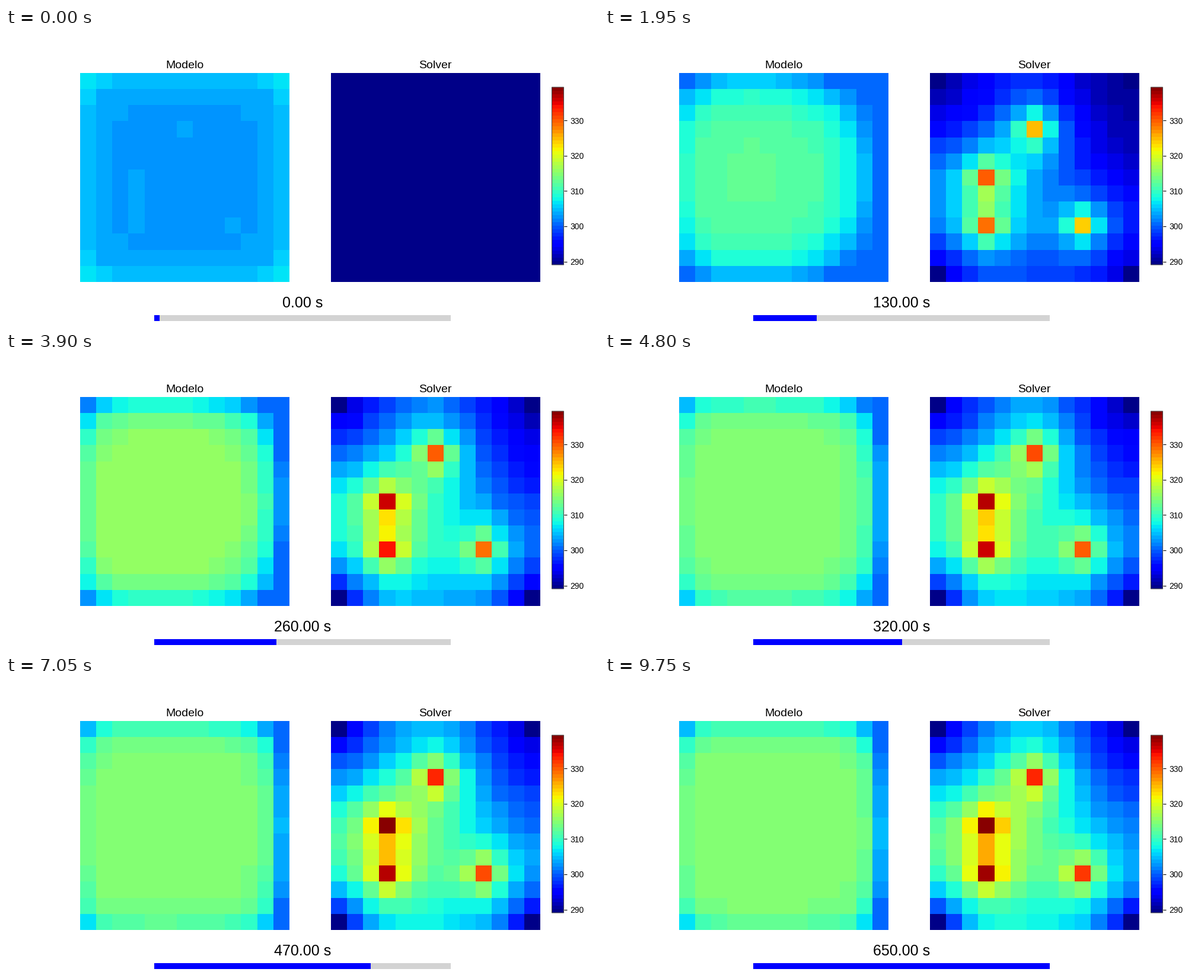
Animation of 1000 by 500 pixels, one loop 9.9 s. Source, as a matplotlib script:

```python
import numpy as np
import matplotlib.pyplot as plt
from matplotlib.animation import FuncAnimation
from matplotlib.colors import ListedColormap
from matplotlib.patches import Rectangle

plt.rcParams["font.family"] = "Liberation Sans"

N = 13
FRAMES = 66
STEP = 10            # simulated seconds per frame
T_MIN, T_MAX = 289.1, 339.4
HEATERS = ([3, 6, 9, 9], [6, 3, 3, 9])
CORNERS = ([0, 0, -1, -1], [0, -1, 0, -1])
NEAR = np.arange(N)  # cell distance from the top or left side
FAR = NEAR[::-1]     # cell distance from the bottom or right side


def solve_board():
    """Conduction with four heaters, radiating faces and cold corners."""
    rate, heat, emission, t_env, t_cold = 0.096, 66.7, 4.18e-10, 279.0, 290.0
    temp = np.full((N, N), t_cold)
    source = np.zeros((N, N))
    source[HEATERS] = heat
    history = [temp.copy()]
    for _ in range(FRAMES - 1):
        for _ in range(STEP):
            p = np.pad(temp, 1, mode="edge")
            lap = p[:-2, 1:-1] + p[2:, 1:-1] + p[1:-1, :-2] + p[1:-1, 2:] - 4 * temp
            temp = temp + rate * (lap + source - emission * (temp**4 - t_env**4))
            temp[CORNERS] = t_cold
        history.append(temp.copy())
    return history


def smoothstep(x):
    x = np.clip(x, 0, 1)
    return x * x * (3 - 2 * x)


def first_guess():
    """Nearly flat board with warm borders and faint heater traces."""
    rim = np.exp(-NEAR / 0.8) + np.exp(-FAR / 0.8)
    board = 302.9 + 1.9 * (rim[:, None] + rim)
    board[HEATERS] += 0.5
    board[7:9, 3] += 0.5
    return board


def warm_board(t):
    """Plateau that overshoots, then settles, with cooling from each side."""
    overshoot = np.exp(-((t - 210) / 50) ** 2 / 2)
    spread = np.exp(-max(0, t - 130) / 150)
    plateau = 303 + 11.7 * smoothstep(t / 190) + 2.5 * overshoot

    top = (9.9 + 5 * overshoot) * np.exp(-NEAR / (1.6 + 0.7 * spread))
    bottom = (7.8 + 2.5 * spread + 5 * overshoot) * np.exp(-FAR / (1.6 + 0.7 * spread))
    left = (5.7 + 3.5 * overshoot) * np.exp(-NEAR / (0.7 + spread))
    right = (16 + 4.5 * overshoot) * np.exp(-FAR / (1 + 2 * spread))

    cooling = (top + bottom)[:, None] + left + right - 6
    drop = 1.5 * np.logaddexp(0, cooling / 1.5)
    return np.maximum(plateau - drop, 301)


def model_board(t):
    mix = min(1, t / 130)
    return (1 - mix) * first_guess() + mix * warm_board(t)


solver_boards = solve_board()
bands = ListedColormap(plt.get_cmap("jet")((np.arange(50) + 0.5) / 50))

fig, axes = plt.subplots(1, 2, figsize=(10, 5), dpi=100)
images = []
for ax, title in zip(axes, ("Modelo", "Solver")):
    images.append(ax.imshow(np.full((N, N), 290.0), cmap=bands, vmin=T_MIN, vmax=T_MAX,
                            interpolation="nearest"))
    ax.set_title(title, fontsize=14)
    ax.axis("off")

bar = fig.colorbar(images[1], cax=fig.add_axes([0.9205, 0.2, 0.02, 0.6]),
                   ticks=range(290, 331, 10))
bar.ax.tick_params(pad=4)
bar.outline.set(edgecolor="0.3", linewidth=0.8, snap=False)

clock = fig.text(0.5, 0.056, "", fontsize=18, ha="center", va="baseline")


def add_track(width, color):
    return fig.add_artist(Rectangle((0.25, 0.01), width, 0.02, fc=color, lw=0))


add_track(0.5, "lightgray")
progress = add_track(0, "blue")


def update(i):
    t = i * STEP
    images[0].set_data(model_board(t))
    images[1].set_data(solver_boards[i])
    clock.set_text(f"{t:.2f} s")
    progress.set_width(min(0.5, 0.5 * (i + 1) / FRAMES + 0.0012))
    return [*images, clock, progress]


anim = FuncAnimation(fig, update, frames=FRAMES, interval=150, repeat=True,
                     repeat_delay=0, blit=False)
plt.show()
```
